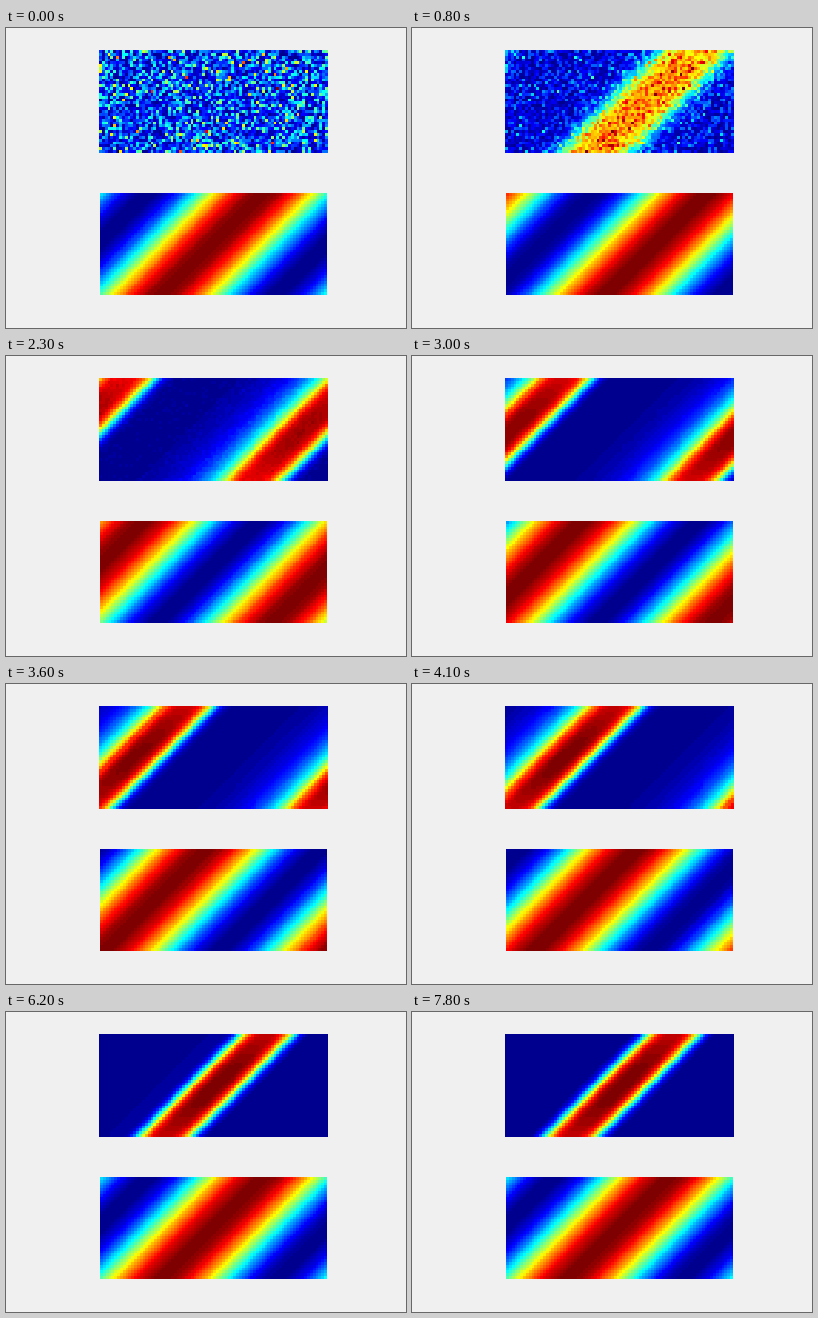
Recreate the animation shown at these times as a matplotlib script. Size 400 px wide and 300 px high, loop 8 s.

```python
import numpy as np
import matplotlib.pyplot as plt
from matplotlib.animation import FuncAnimation
from matplotlib.colors import ListedColormap

W, H, DPI = 400, 300, 100
FRAMES, INTERVAL, LAST = 80, 100, 78
COLS, ROWS = 80, 36
PERIOD = 230.0            # stripe spacing along x + y, in pixels
STEP, STOP = 4.8, 48      # stimulus drift per frame, frame of rest
TOP = (92.5, 321.5, 22, 125)
BOTTOM = (94, 320.5, 165, 267)

# classic 64-level jet, starting at a slightly lighter navy
level = np.arange(1, 65) / 64
jet = ListedColormap(np.column_stack(
    [np.clip(1.5 - np.abs(4 * level - k), 0, 1) for k in (3, 2, 1)]))

noise = np.abs(np.random.default_rng(4).normal(0, 0.25, (ROWS, COLS)))


def cells(x0, x1, y0, y1):
    x = x0 + (np.arange(COLS) + 0.5) * (x1 - x0) / COLS
    y = y0 + (np.arange(ROWS) + 0.5) * (y1 - y0) / ROWS
    return np.meshgrid(x, y)


XT, YT = cells(*TOP)
XB, YB = cells(*BOTTOM)
fade = 1 - 0.075 * ((YT - 73.5) / 51) ** 2


def stimulus(i):
    centre = 422 + STEP * min(i, STOP)
    return 0.5 + 0.5 * np.cos(2 * np.pi * (XB + YB - centre) / PERIOD)


def bump_centre(i):
    """The bump trails the moving stimulus, then relaxes onto it."""
    t, rest = min(i, STOP) / 10, max(i - STOP, 0) / 10
    lag = 25 * (1 - np.exp(-1.1 * t)) * np.exp(-3 * rest)
    return 283 + STEP * min(i, STOP) - lag


def response(i):
    t = i / 10
    d = (XT + YT - bump_centre(i) + PERIOD / 2) % PERIOD - PERIOD / 2
    width = 28 + 20 * np.exp(-t / 1.6)
    bump = np.exp(-(np.abs(d) / width) ** 3.5)
    wake = np.clip((t - 1.3) / 0.9, 0, 1) * np.exp(-2 * max(t - 5, 0))
    tail = wake * np.minimum(0.85, 0.62 * np.exp((d + 28) / 24)) * (d < 0)
    growth = 1 - np.exp(-1.3 * t)
    stripe = np.maximum(bump, tail) * fade * growth
    return np.clip(stripe + noise * np.exp(-0.9 * t ** 1.5), 0, 1)


fig = plt.figure(figsize=(W / DPI, H / DPI), dpi=DPI, facecolor="#f0f0f0")
ax = fig.add_axes([0, 0, 1, 1])
ax.axis("off")


def panel(data, box):
    x0, x1, y0, y1 = box
    return ax.imshow(data, cmap=jet, vmin=0, vmax=1, aspect="auto",
                     interpolation="nearest", extent=(x0, x1, y1, y0))


upper = panel(response(0), TOP)
lower = panel(stimulus(0), BOTTOM)
ax.set_xlim(0, W)
ax.set_ylim(H, 0)


def update(frame):
    i = min(frame, LAST)
    upper.set_data(response(i))
    lower.set_data(stimulus(i))
    return upper, lower


anim = FuncAnimation(fig, update, frames=FRAMES, interval=INTERVAL,
                     repeat=True, repeat_delay=0, blit=False)
plt.show()
```
